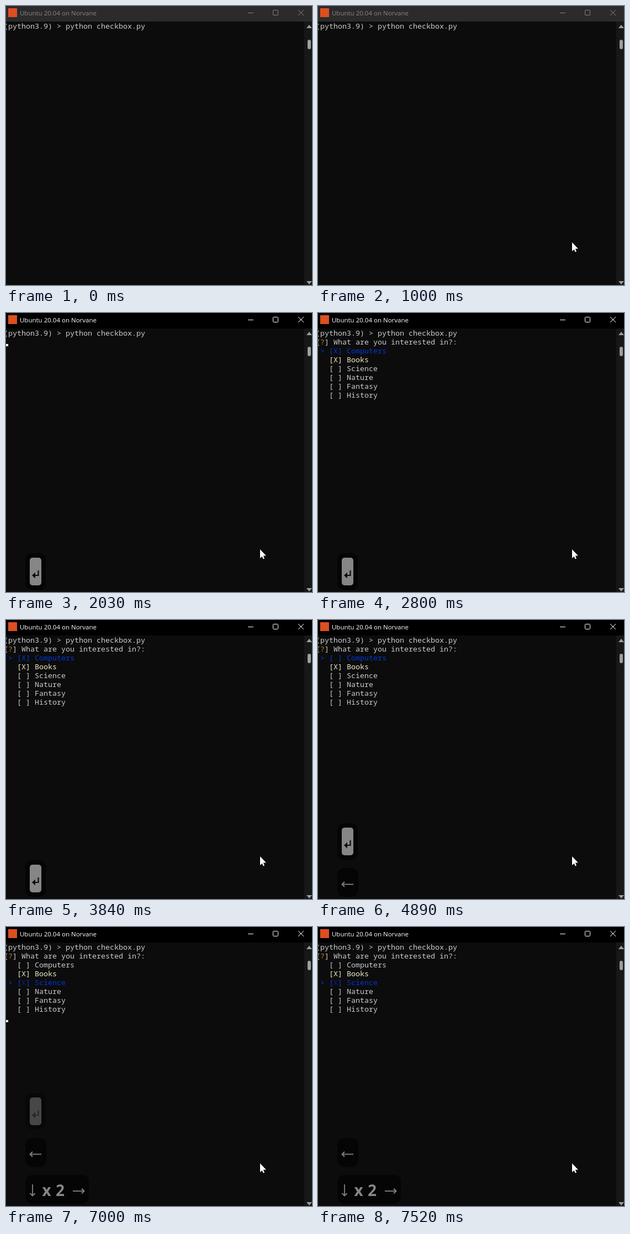
Write an HTML page with a canvas that moves like this. It is 554 by 504 pixels and loops after 8 s.

```html
<!DOCTYPE html>
<html lang="en">
<head>
<meta charset="utf-8">
<title>Checkbox prompt</title>
<style>
  html, body { margin: 0; width: 100%; height: 100%; overflow: hidden; background: #0c0c0c; }
  canvas { display: block; }
</style>
</head>
<body>
<canvas id="stage" width="554" height="504"></canvas>
<script>
const ctx = document.getElementById('stage').getContext('2d', { alpha: false });
const LOOP = 8000;
const CELL = { w: 8, h: 16, left: -4, top: 28 };
const MONO = '13.333px "Noto Sans Mono", monospace';
const TEXT = '#cccccc', BLUE = '#0037da', CREAM = '#f3edcb', KEY = '#868686';
const OPTIONS = ['Computers', 'Books', 'Science', 'Nature', 'Fantasy', 'History'];
const CURSOR_ON = [[2280, 2800], [3330, 3840], [4360, 4890], [5410, 6480], [6740, 7520]];

function rect(x, y, w, h, color) {
  ctx.fillStyle = color;
  ctx.fillRect(x, y, w, h);
}

function rounded(x, y, w, h, r, color) {
  ctx.fillStyle = color;
  ctx.beginPath();
  ctx.roundRect(x, y, w, h, r);
  ctx.fill();
}

function trace(points) {
  ctx.beginPath();
  points.forEach(([x, y]) => ctx.lineTo(x, y));
}

function polygon(points, color) {
  trace(points);
  ctx.closePath();
  ctx.fillStyle = color;
  ctx.fill();
}

function line(points, color, width) {
  trace(points);
  ctx.strokeStyle = color;
  ctx.lineWidth = width;
  ctx.stroke();
}

function label(text, x, y, font, color) {
  ctx.font = font;
  ctx.fillStyle = color;
  ctx.fillText(text, x, y);
}

function print(text, col, row, color = TEXT) {
  label(text, CELL.left + col * CELL.w, CELL.top + row * CELL.h + 13, MONO, color);
}

function cursor(col, row) {
  rect(CELL.left + col * CELL.w, CELL.top + row * CELL.h + 12, 8, 4, '#ffffff');
}

function titleBar(active) {
  const color = active ? '#ffffff' : '#858585';
  rect(0, 0, 554, 28, active ? '#000000' : '#2b2b2b');
  rect(4, 4, 16, 16, '#dd4f20');
  label('Ubuntu 20.04 on Norvane', 25, 17, '500 11.5px "Open Sans", sans-serif', color);
  line([[438, 12.5], [448, 12.5]], color, 1);
  line([[529, 7], [539, 17]], color, 1);
  line([[539, 7], [529, 17]], color, 1);
  ctx.beginPath();
  ctx.roundRect(483.5, 7.5, 9, 9, 1);
  ctx.stroke();
}

function scrollBar() {
  rect(540, 28, 14, 476, '#171717');
  polygon([[544, 40], [549, 34], [554, 40]], '#9f9f9f');
  polygon([[544, 497], [549, 503], [554, 497]], '#9f9f9f');
  rounded(546, 61, 6, 17, 3, '#9f9f9f');
}

function menu(t) {
  const current = t < 5410 ? 0 : t < 5950 ? 1 : 2;
  const checked = [t < 4360, true, t >= 6740];
  print('[ ] What are you interested in?:', 0, 1);
  print('?', 1, 1, '#c1802c');
  OPTIONS.forEach((name, i) => {
    const row = i + 2;
    const color = i === current ? BLUE : checked[i] ? CREAM : TEXT;
    if (i === current) print('>', 1, row, color);
    print('[ ] ' + name, 3, row, color);
    if (checked[i]) print('X', 4, row, i === 2 ? '#0a2474' : color);
  });
}

// Thin arrow, 21 px long, centred on (x, y)
function arrow(x, y, angle) {
  ctx.save();
  ctx.translate(x, y);
  ctx.rotate(angle);
  line([[-10.5, 0], [10, 0]], KEY, 1.8);
  line([[5.5, -4.5], [10, 0], [5.5, 4.5]], KEY, 1.8);
  ctx.restore();
}

function panel(y, w, h) {
  rounded(35, y, w, h, 12, '#050505');
}

function enterKey(y, alpha) {
  ctx.save();
  ctx.globalAlpha = alpha;
  panel(y - 8, 37, 66);
  rounded(43, y, 21, 50, 5, KEY);
  line([[58.5, y + 23], [58.5, y + 32], [52, y + 32]], '#0c0c0c', 2.2);
  polygon([[47, y + 32], [53, y + 26.5], [53, y + 37.5]], '#0c0c0c');
  ctx.restore();
}

function keyOverlay(t) {
  const shift = 67 * ((t >= 4360) + (t >= 5410));
  if (t < 7260) enterKey(442 - shift, t < 7000 ? 1 : 0.5);
  if (t >= 4360) {
    const y = t < 5410 ? 448 : 381;
    panel(y, 38, 52);
    arrow(53.5, y + 29.5, Math.PI);
  }
  if (t >= 5410) {
    panel(448, t < 5950 ? 38 : t < 6740 ? 87 : 115, 52);
    arrow(48, 475.5, Math.PI / 2);
    if (t >= 5950) {
      const bold = 'bold 28px "Open Sans", sans-serif';
      label('x', 65.5, 485.5, bold, KEY);
      label('2', 90, 485.5, bold, KEY);
    }
    if (t >= 6740) arrow(131.5, 477, 0);
  }
}

function pointer(x, y) {
  const shape = [[0, 0], [0, 16], [3.6, 12.7], [5.8, 17.6], [8, 16.6], [5.9, 11.6], [11, 11.4]];
  polygon(shape.map(([dx, dy]) => [x + dx, y + dy]), '#ffffff');
}

function draw(t) {
  rect(0, 0, 554, 504, '#0c0c0c');
  print('(python3.9) > python checkbox.py', 0, 0);
  if (t >= 2280) menu(t);
  if (t >= 1770 && t < 2030) cursor(33, 0);
  if (t >= 2030 && t < 2280) cursor(0, 1);
  if (CURSOR_ON.some(([start, end]) => t >= start && t < end)) cursor(0, 8);
  scrollBar();
  titleBar(t >= 1250);
  if (t >= 2030) keyOverlay(t);
  if (t >= 1000) pointer(460, 427);
  else if (t >= 750) pointer(517, 494);
}

const start = performance.now();
function frame() {
  draw((performance.now() - start) % LOOP);
  requestAnimationFrame(frame);
}
frame();
</script>
</body>
</html>
```
